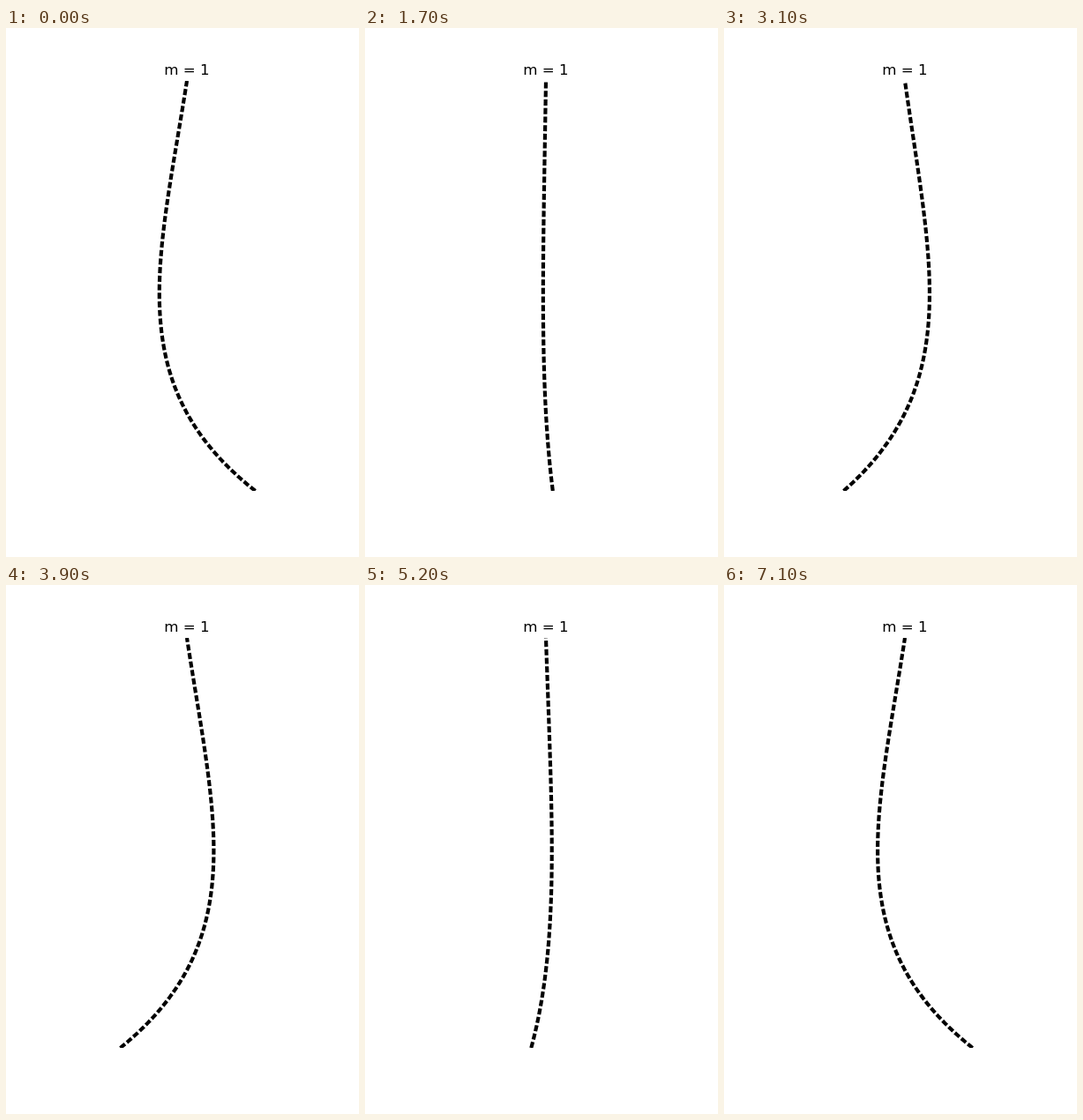
Write an HTML page that moves like this. It is 400x600 px and loops after 7200 ms.

```html
<!DOCTYPE html>
<html lang="en">
<head>
<meta charset="utf-8">
<title>Hanging rope mode</title>
<style>
  html, body { margin: 0; width: 100%; height: 100%; overflow: hidden; background: #fff; }
  svg { display: block; }
  text { font: 16.667px "DejaVu Sans", sans-serif; text-anchor: middle; }
  path { fill: none; stroke: #000; stroke-width: 4.167; stroke-dasharray: 6.944 2.778; }
</style>
</head>
<body>
<svg width="400" height="600" viewBox="0 0 400 600">
  <clipPath id="axes"><rect x="50" y="60" width="310" height="465"/></clipPath>
  <text x="205" y="53">m = 1</text>
  <g clip-path="url(#axes)"><path id="rope"/></g>
</svg>
<script>
  const ROOT = 5.520078;               // second zero of J0
  const OMEGA = ROOT / 2 * Math.sqrt(9.81);
  const STEP = 100, STEPS = 72, DT = 0.01;
  const POINTS = 200;
  const rope = document.getElementById('rope');

  // J0(ROOT * sqrt(s)) as a power series in s
  function shape(s) {
    const q = ROOT * ROOT * s / 4;
    let term = 1, sum = 1;
    for (let k = 1; k < 25; k++) {
      term *= -q / (k * k);
      sum += term;
    }
    return sum;
  }

  const mode = Array.from({ length: POINTS + 1 }, (_, i) => shape(i / POINTS));

  function draw(step) {
    const amp = 77.5 * Math.cos(OMEGA * step * DT);
    rope.setAttribute('d', 'M' + mode.map((u, i) =>
      (205 + amp * u).toFixed(3) + ',' + (525 - 465 * i / POINTS).toFixed(3)).join('L'));
  }

  let shown = -1;
  function tick() {
    const step = Math.floor(performance.now() / STEP) % STEPS;
    if (step !== shown) draw(shown = step);
    requestAnimationFrame(tick);
  }
  tick();
</script>
</body>
</html>
```
